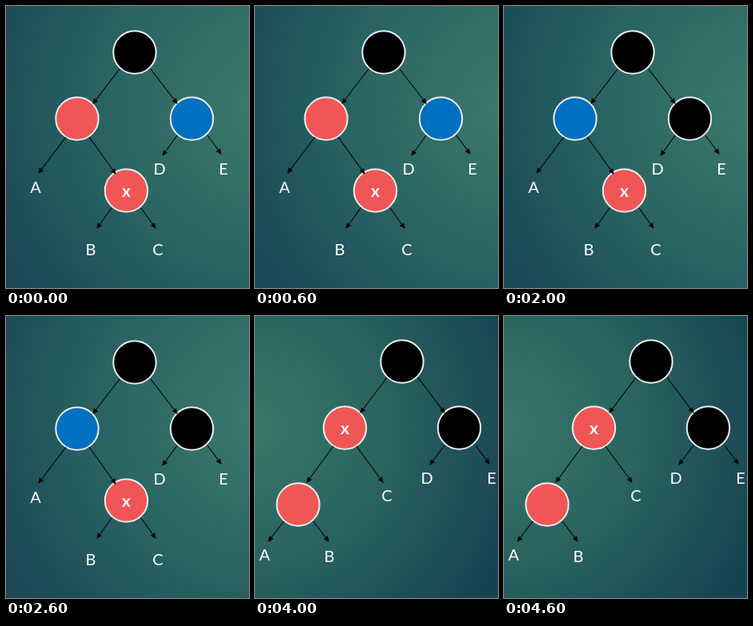
An HTML page with a canvas that plays this animation: 304 px wide and 353 px high, repeating every 5000 ms.

```html
<!DOCTYPE html>
<html>
<head>
<meta charset="utf-8">
<title>Tree rotation</title>
<style>
html, body { margin: 0; width: 100%; height: 100%; overflow: hidden; }
canvas { display: block; }
</style>
</head>
<body>
<canvas id="stage" width="304" height="353"></canvas>
<script>
const ctx = document.getElementById('stage').getContext('2d');
const RED = '#f05656', BLUE = '#0070c0', BLACK = '#000';

const before = {
  glow: [325, 125, 375],
  shades: ['#3c7a6c', '#2b6663', '#1a4855'],
  arrows: [
    [142, 79, 109, 122], [181, 79, 214, 122],
    [75, 164, 41, 209], [104, 164, 137, 210],
    [214, 162, 196, 187], [252, 162, 269, 185],
    [132, 253, 114, 278], [169, 253, 187, 278]
  ],
  nodes: { root: [161, 58], left: [89, 141], right: [232.5, 141], x: [150.5, 231] },
  leaves: { A: [37, 234], B: [106, 312], C: [190, 312], D: [192, 211], E: [272, 211] }
};

const after = {
  glow: [0, 140, 345],
  shades: ['#3a776b', '#29625f', '#174251'],
  arrows: [
    [165, 77, 132, 121], [204, 77, 237, 121],
    [98, 163, 65, 208], [127, 163, 160, 208],
    [237, 162, 219, 186], [276, 162, 293, 185],
    [36, 257, 17, 282], [73, 257, 92, 282]
  ],
  nodes: { root: [184, 57], left: [54, 236], right: [255.5, 140], x: [112.5, 140] },
  leaves: { A: [12, 306], B: [93, 308], C: [165, 232], D: [215, 210], E: [296, 210] }
};

function background({ glow: [x, y, r], shades }) {
  const fill = ctx.createRadialGradient(x, y, 0, x, y, r);
  shades.forEach((shade, i) => fill.addColorStop(i / 2, shade));
  ctx.fillStyle = fill;
  ctx.fillRect(0, 0, 304, 353);
}

function arrow([x1, y1, x2, y2]) {
  ctx.strokeStyle = ctx.fillStyle = BLACK;
  ctx.lineWidth = 1.1;
  ctx.beginPath();
  ctx.moveTo(x1, y1);
  ctx.lineTo(x2, y2);
  ctx.stroke();
  ctx.save();
  ctx.translate(x2, y2);
  ctx.rotate(Math.atan2(y2 - y1, x2 - x1));
  ctx.beginPath();
  ctx.moveTo(1, 0);
  ctx.lineTo(-6, -3.2);
  ctx.lineTo(-6, 3.2);
  ctx.fill();
  ctx.restore();
}

function node([x, y], color) {
  ctx.beginPath();
  ctx.arc(x, y, 26.7, 0, Math.PI * 2);
  ctx.fillStyle = color;
  ctx.fill();
  ctx.strokeStyle = '#e8eeec';
  ctx.lineWidth = 2;
  ctx.stroke();
}

function label(text, [x, y], font) {
  ctx.font = font + ' Lato, sans-serif';
  ctx.textAlign = 'center';
  ctx.fillStyle = '#fff';
  ctx.fillText(text, x, y);
}

function draw(now) {
  const step = Math.floor(now % 5000 / 1000);
  const tree = step < 4 ? before : after;
  const colors = {
    root: BLACK,
    left: step === 2 ? BLUE : RED,
    right: step === 0 ? BLUE : BLACK,
    x: RED
  };
  background(tree);
  for (const name in tree.nodes) node(tree.nodes[name], colors[name]);
  tree.arrows.forEach(arrow);
  for (const name in tree.leaves) label(name, tree.leaves[name], '20px');
  const [x, y] = tree.nodes.x;
  label('x', [x, y + 8], 'bold 21px');
}

let start;
function tick(now) {
  start ??= now;
  draw(now - start);
  requestAnimationFrame(tick);
}
draw(0);
requestAnimationFrame(tick);
</script>
</body>
</html>
```
